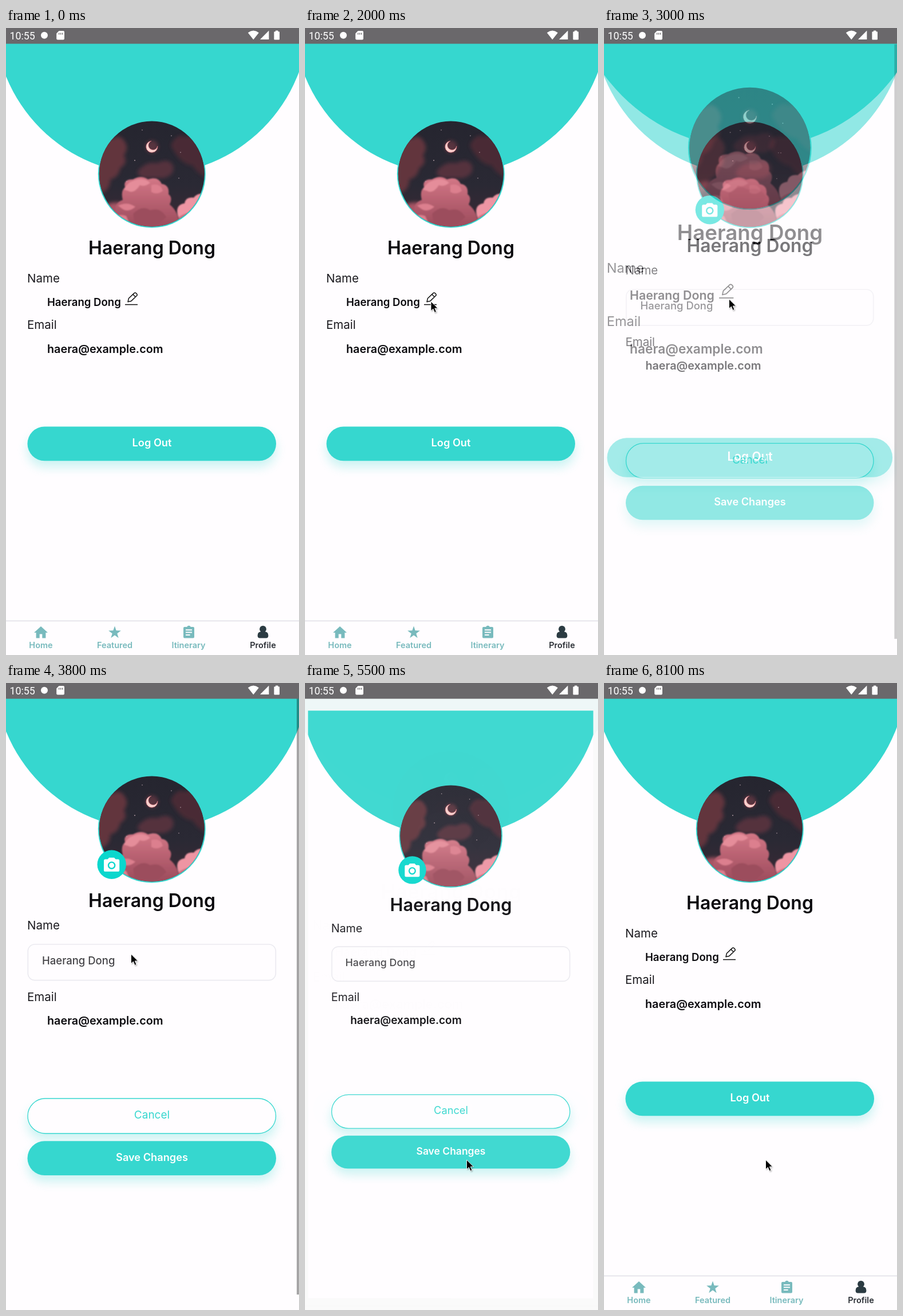
These frames come from a looping animation (512x1094 px, 8400 ms). An HTML page:

```html
<!DOCTYPE html>
<html lang="en">
<head>
<meta charset="utf-8">
<title>Profile edit</title>
<style>
  html, body { margin: 0; width: 100%; height: 100%; overflow: hidden; background: #fafafa; }
  svg { display: block; width: 100vw; height: 100vh; }
  text { font-family: Inter, "Open Sans", sans-serif; fill: #0b0a0e; }
  .title { font-size: 32px; font-weight: 600; text-anchor: middle; }
  .label { font-size: 20.5px; font-weight: 400; fill: #1b1a1f; }
  .value { font-size: 18.6px; font-weight: 600; }
  .mail { font-size: 19.8px; font-weight: 600; }
  .field { font-size: 18.5px; font-weight: 500; fill: #444347; }
  .btn { font-size: 18.2px; font-weight: 600; text-anchor: middle; fill: #fff; }
  .ghost { font-size: 19px; font-weight: 400; text-anchor: middle; fill: #36d7cf; }
  .tab { font-size: 14.5px; font-weight: 600; text-anchor: middle; fill: #78babd; }
  .clock { font-family: Roboto, sans-serif; font-size: 17.8px; fill: #fff; }
  .shadow { fill: #36d7cf; opacity: 0.26; filter: url(#soft); }
</style>
</head>
<body>
<svg viewBox="0 0 512 1094" preserveAspectRatio="none">
  <defs>
    <filter id="soft" x="-10%" y="-60%" width="120%" height="240%"><feGaussianBlur stdDeviation="9"/></filter>
    <filter id="haze" x="-30%" y="-30%" width="160%" height="160%"><feGaussianBlur stdDeviation="3"/></filter>
    <filter id="edge"><feGaussianBlur stdDeviation="0.9"/></filter>
    <clipPath id="round"><circle cx="254.8" cy="254.6" r="92"/></clipPath>
    <clipPath id="sheet"><rect x="-5" y="27" width="519" height="1068"/></clipPath>
    <linearGradient id="sky" x1="0" y1="0" x2="0" y2="1">
      <stop offset="0" stop-color="#25252f"/>
      <stop offset="0.6" stop-color="#2a2934"/>
      <stop offset="1" stop-color="#3c2935"/>
    </linearGradient>
    <linearGradient id="cloud" x1="0" y1="0" x2="0" y2="1">
      <stop offset="0" stop-color="#d47887"/>
      <stop offset="0.45" stop-color="#b96272"/>
      <stop offset="1" stop-color="#9a4a5b"/>
    </linearGradient>

    <g id="avatar">
      <circle cx="254.8" cy="254.6" r="94" fill="#36d7cf"/>
      <g clip-path="url(#round)">
        <rect x="160" y="160" width="190" height="190" fill="url(#sky)"/>
        <g filter="url(#haze)">
          <path d="M155 195Q172 186 184 194Q198 184 206 196Q216 208 206 222Q214 236 200 244Q196 262 182 264Q184 286 155 292Z" fill="#62343d"/>
          <path d="M288 205Q298 182 314 190Q330 180 352 200V262Q334 254 326 240Q304 238 288 205Z" fill="#482b36"/>
          <path d="M236 244Q248 232 264 236Q284 226 292 240Q296 256 276 262L240 262Q222 254 236 244Z" fill="#55323e"/>
          <path d="M160 318Q180 300 205 306V350H160Z" fill="#a85465"/>
        </g>
        <g filter="url(#edge)">
          <path d="M182 348Q178 330 192 322Q188 306 204 300Q200 284 208 278Q204 264 222 264Q236 256 248 264Q266 258 272 272Q286 274 284 290Q292 296 286 308Q304 322 302 350H182Z" fill="url(#cloud)"/>
          <path d="M206 282Q211 270 224 266Q240 260 252 270Q242 278 234 274Q224 290 213 284Z" fill="#e58d9a"/>
          <path d="M254 274Q270 270 274 284Q264 292 254 286ZM196 310Q212 302 226 312Q214 322 204 316ZM184 336Q194 322 210 328L218 346H186Z" fill="#dc7f8e"/>
          <path d="M222 324Q238 308 252 318Q270 312 280 330L262 346H226Z" fill="#9c4d5d"/>
          <path d="M300 326Q296 308 312 306Q314 294 328 296Q336 286 352 290V345H306Z" fill="#ee95a3"/>
          <path d="M302 330Q318 318 334 324L350 314V350H300Z" fill="#cc6f80"/>
        </g>
        <g fill="#b9a3ab">
          <circle cx="225" cy="231" r="0.9"/><circle cx="289" cy="188" r="0.8"/><circle cx="305" cy="217" r="0.8"/>
          <circle cx="211" cy="268" r="0.8"/><circle cx="302" cy="262" r="0.8"/><circle cx="238" cy="178" r="0.8"/>
        </g>
        <circle cx="255" cy="207" r="11" fill="#a24a55" opacity="0.4" filter="url(#haze)"/>
        <path d="M254 197.2A10 10 0 1 0 264.8 206A8 8 0 1 1 254 197.2Z" fill="#f9d2cf" stroke="#d4707a" stroke-width="0.7"/>
      </g>
    </g>

    <g id="backdrop">
      <rect x="-5" y="27" width="519" height="1068" fill="#fffdff"/>
      <circle cx="254.5" cy="-19" r="274.7" fill="#36d7cf"/>
      <use href="#avatar"/>
    </g>
  </defs>

  <rect width="512" height="1094" fill="#fafafa"/>
  <g id="view" clip-path="url(#sheet)">
    <use href="#backdrop"/>
    <text class="title" x="255" y="395">Haerang Dong</text>
    <text class="label" x="37" y="444">Name</text>
    <text class="value" x="72" y="485">Haerang Dong</text>
    <g fill="none" stroke="#111" stroke-width="1.5" stroke-linejoin="round">
      <path d="M208 482.6H230"/>
      <path d="M213 477.8L214.4 471.8L224 462.6Q225.7 461.2 227.5 462.8L228.6 464Q229.9 465.6 228.4 467.2L218.8 476.4ZM221.8 464.8L226.2 469.3"/>
    </g>
    <text class="label" x="37" y="525">Email</text>
    <text class="mail" x="72" y="567">haera@example.com</text>
    <rect class="shadow" x="37.5" y="706" width="434.5" height="60" rx="30"/>
    <rect x="37.5" y="695.5" width="434.5" height="59.7" rx="29.8" fill="#36d7cf"/>
    <text class="btn" x="255" y="730">Log Out</text>
    <path d="M-5 1034.5H514" stroke="#e0dfe5" stroke-width="1.3"/>
    <g fill="#78babd">
      <path d="M61 1044L49 1055H52.6V1064.4H58.7V1057.4H63.3V1064.4H69.4V1055H73Z"/>
      <path id="star"/>
      <path fill-rule="evenodd" d="M312 1045H316.2A3.6 3.6 0 0 1 322.8 1045H327Q329 1045 329 1047V1062.5Q329 1064.5 327 1064.5H312Q310 1064.5 310 1062.5V1047Q310 1045 312 1045ZM314 1049.2V1051.2H325V1049.2ZM314 1053.6V1055.6H325V1053.6ZM314 1058V1060H321.6V1058Z"/>
    </g>
    <path d="M449 1043A5.8 5.8 0 0 1 452.8 1053.2Q458.4 1054 458.4 1060Q458.4 1064.5 454.4 1064.5H443.6Q439.6 1064.5 439.6 1060Q439.6 1054 445.2 1053.2A5.8 5.8 0 0 1 449 1043Z" fill="#2b3b42"/>
    <text class="tab" x="61" y="1082">Home</text>
    <text class="tab" x="190" y="1082">Featured</text>
    <text class="tab" x="319" y="1082">Itinerary</text>
    <text class="tab" x="449" y="1082" style="fill:#2b2f35">Profile</text>
    <rect id="viewBar" x="508" y="27" width="6" height="923.5"/>
  </g>

  <g id="edit" clip-path="url(#sheet)">
    <use href="#backdrop"/>
    <circle cx="184.7" cy="316.7" r="25.2" fill="#0bd7cd"/>
    <path fill-rule="evenodd" d="M173.6 307.6H177.6L180.2 304.8H189L191.6 307.6H195.6Q198.2 307.6 198.2 310.2V326.4Q198.2 329 195.6 329H173.6Q171 329 171 326.4V310.2Q171 307.6 173.6 307.6ZM184.6 311.4A6.8 6.8 0 1 0 184.6 325A6.8 6.8 0 1 0 184.6 311.4ZM184.6 313.8A4.4 4.4 0 1 1 184.6 322.6A4.4 4.4 0 1 1 184.6 313.8Z" fill="#fff"/>
    <text class="title" x="255" y="391">Haerang Dong</text>
    <text class="label" x="37" y="429.5">Name</text>
    <rect x="38.3" y="456" width="433" height="62.7" rx="12" fill="#fffdff" stroke="#ebeaf0" stroke-width="1.7"/>
    <text class="field" x="63" y="491">Haerang Dong</text>
    <text class="label" x="37" y="555">Email</text>
    <text class="mail" x="72" y="596">haera@example.com</text>
    <rect class="shadow" x="37.5" y="736" width="434.5" height="61" rx="30"/>
    <rect x="38" y="725" width="433.5" height="61" rx="30.5" fill="#fffdff" stroke="#36d7cf" stroke-width="1.3"/>
    <text class="ghost" x="255" y="760">Cancel</text>
    <rect class="shadow" x="37.5" y="810" width="434.5" height="60" rx="30"/>
    <rect x="37.5" y="799.3" width="434.5" height="59.7" rx="29.8" fill="#36d7cf"/>
    <text class="btn" x="255" y="834">Save Changes</text>
    <rect id="editBar" x="508" y="27" width="6" height="1040"/>
  </g>

  <rect width="512" height="27.5" fill="#6a686b"/>
  <text class="clock" x="6.5" y="19.6">10:55</text>
  <g fill="#fff">
    <circle cx="67" cy="12.8" r="6"/>
    <path fill-rule="evenodd" d="M92.6 5H100Q102 5 102 7V18.6Q102 20.6 100 20.6H90.2Q88.2 20.6 88.2 18.6V9.4ZM92 8.4V11.4H93.4V8.4ZM95 8.4V11.4H96.4V8.4ZM98 8.4V11.4H99.4V8.4Z"/>
    <path d="M432.3 20.2L422.8 8.2Q432.3 1 441.8 8.2Z"/>
    <path d="M459.4 4.6V20H444Z"/>
    <path d="M471 4.4H475.4V6.2H477Q478 6.2 478 7.4V19.2Q478 20.4 477 20.4H469.4Q468.4 20.4 468.4 19.2V7.4Q468.4 6.2 469.4 6.2H471Z"/>
  </g>
  <g id="cursor">
    <path d="M1 2V18.5L5 15L7.6 21.5L11 20L8.4 14H13.4Z" fill="#000" opacity="0.28" filter="url(#edge)"/>
    <path d="M0 0V16.6L3.9 13L6.6 19.4L9.4 18.2L6.8 12H12Z" fill="#000" stroke="#fff" stroke-width="0.9"/>
  </g>
</svg>
<script>
const LOOP = 8400, STEP = 100, OPEN = 2700, CLOSE = 5470, CX = 254.5, CY = 561;
const el = id => document.getElementById(id);
const view = el('view'), edit = el('edit'), cursor = el('cursor');

// time, x, y of the pointer tip
const path = [
  [100, 290, 1060], [900, 219, 472], [1400, 219, 472], [1500, 221, 486], [1700, 221, 486],
  [2000, 220, 477], [2300, 220, 477], [2500, 218.5, 473], [4400, 218.5, 473], [5200, 282.5, 832]
];

const clamp = u => Math.min(1, Math.max(0, u));
const ramp = (t, start, span) => clamp((t - start) / span);
const settle = u => 1 - Math.pow(1 - u, 6);
const glide = u => u * u * (3 - 2 * u);

function pointerAt(t) {
  const i = path.findIndex(k => k[0] > t);
  if (i < 0) return path[path.length - 1].slice(1);
  const [t0, x0, y0] = path[Math.max(0, i - 1)], [t1, x1, y1] = path[i];
  const u = glide(clamp((t - t0) / (t1 - t0 || 1)));
  return [x0 + (x1 - x0) * u, y0 + (y1 - y0) * u];
}

function place(page, scale, alpha) {
  page.setAttribute('transform', `translate(${CX} ${CY}) scale(${scale}) translate(${-CX} ${-CY})`);
  page.setAttribute('opacity', alpha);
}

function bar(id, t, shown, fade) {
  el(id).setAttribute('opacity', t < shown ? 0 : 0.35 * (1 - ramp(t, fade, 450)));
}

function draw(t) {
  const closing = t >= CLOSE, start = closing ? CLOSE : OPEN;
  const p = settle(ramp(t, start, 600)), alpha = ramp(t, start, 550);
  place(view, closing ? 1.15 - 0.15 * p : 1 + 0.15 * p, closing ? alpha : 1);
  place(edit, closing ? 1 - 0.15 * p : 0.85 + 0.15 * p, closing ? 1 - alpha : alpha);
  bar('editBar', t, OPEN, 4050);
  bar('viewBar', t, CLOSE, 6750);
  const [x, y] = pointerAt(t);
  cursor.setAttribute('transform', `translate(${x} ${y})`);
  cursor.style.display = t < 100 ? 'none' : '';
}

el('star').setAttribute('d', 'M' + Array.from({ length: 10 }, (_, i) => {
  const r = i % 2 ? 4.5 : 11.4, a = i * Math.PI / 5;
  return `${190 + r * Math.sin(a)} ${1055 - r * Math.cos(a)}`;
}).join('L') + 'Z');

const begin = performance.now();
function tick() {
  const t = (performance.now() - begin) % LOOP;
  draw(Math.floor(t / STEP) * STEP);
  requestAnimationFrame(tick);
}
tick();
</script>
</body>
</html>
```
